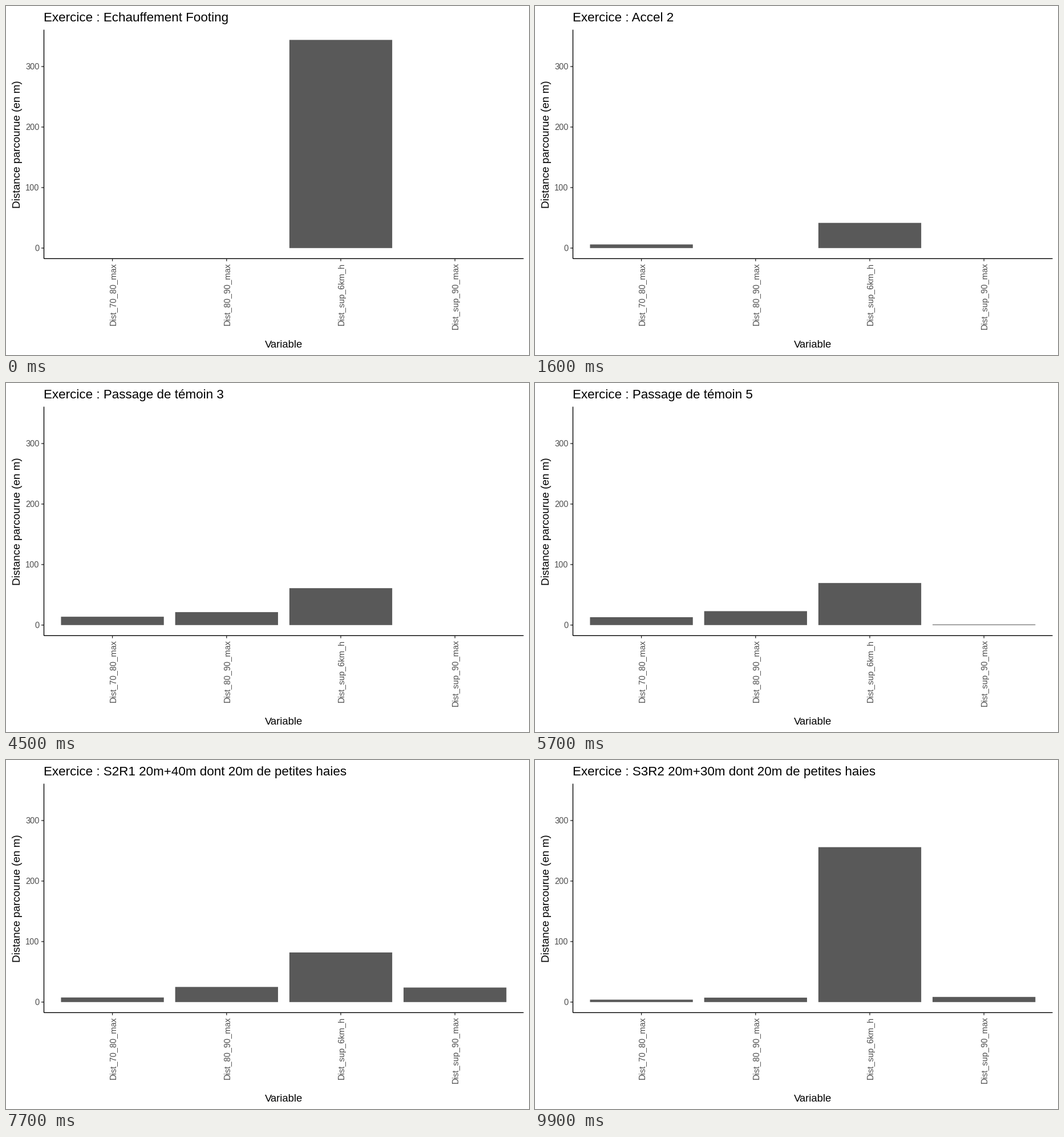
Write a matplotlib script that moves like this. It is 917 px wide and 611 px high and loops after 10 s.

```python
import matplotlib.pyplot as plt
from matplotlib.animation import FuncAnimation
from matplotlib.patches import Rectangle

W, H, DPI = 917, 611, 120
LEFT, RIGHT, TOP, BOTTOM = 66.5, 907.5, 41.5, 442.3
ZERO_Y, PX_PER_M = 423.8, 1.0594
LINE = 1.4
FIRST_X, STEP_X, BAR_W = 186.6, 200.2, 180.3

LABELS = ["Dist_70_80_max", "Dist_80_90_max", "Dist_sup_6km_h", "Dist_sup_90_max"]

SHORT = "20m+30m dont 20m de petites haies"
LONG = "20m+40m dont 20m de petites haies"

# Exercise name and the four distances in metres
STATES = [
    ("Echauffement Footing", (0, 0, 344, 0)),
    ("Echauffement Gammes", (0, 0, 109.6, 0)),
    ("Accel 1", (0, 0, 36, 0)),
    ("Accel 2", (8, 0, 43.5, 0)),
    ("Accel 3", (12.3, 0, 48, 0)),
    ("Passage de témoin 1", (19.4, 0, 53, 0)),
    ("Passage de témoin 2", (14.2, 18, 57, 0)),
    ("Passage de témoin 3", (15.3, 20, 60, 0)),
    ("Passage de témoin 4", (12.3, 22.8, 62, 0)),
    ("Passage de témoin 5", (14, 21, 65, 0)),
    ("S1R1 " + SHORT, (12, 25, 74, 2)),
    ("S1R2 " + SHORT, (9.5, 27, 78, 19.5)),
    ("S1R3 " + SHORT, (10.5, 23, 82, 23.5)),
    ("S2R1 " + LONG, (7.6, 25, 82, 24)),
    ("S2R2 " + LONG, (11.3, 24, 83, 26)),
    ("S3R1 " + SHORT, (11.7, 23, 85, 27)),
    ("S3R2 " + SHORT, (12, 22, 80, 25.5)),
]

plt.rcParams["font.family"] = "Liberation Sans"
plt.rcParams["text.hinting"] = "no_autohint"
fig = plt.figure(figsize=(W / DPI, H / DPI), dpi=DPI, facecolor="white")
ax = fig.add_axes([0, 0, 1, 1])
ax.set_xlim(0, W)
ax.set_ylim(H, 0)
ax.axis("off")


def box(x0, y0, x1, y1, color):
    return ax.add_patch(Rectangle((x0, y0), x1 - x0, y1 - y0, fc=color, lw=0,
                                  snap=False))


def hline(x0, x1, y, color):
    box(x0, y - LINE / 2, x1, y + LINE / 2, color)


def vline(x, y0, y1, color):
    box(x - LINE / 2, y0, x + LINE / 2, y1, color)


def label(x, y, text, size, color="black", ha="left", angle=0):
    return ax.text(x, y, text, size=size, color=color, ha=ha, va="baseline",
                   rotation=angle, rotation_mode="anchor")


bars = []
for i, name in enumerate(LABELS):
    x = FIRST_X + STEP_X * i
    bars.append(box(x - BAR_W / 2, ZERO_Y, x + BAR_W / 2, ZERO_Y, "#595959"))
    vline(x, BOTTOM, BOTTOM + 4.5, "#333333")
    label(x + 5.4, 449.3, name, 8.75, "#4D4D4D", "right", 90)

for metres in (0, 100, 200, 300):
    y = ZERO_Y - metres * PX_PER_M
    hline(LEFT - 4.5, LEFT, y, "#333333")
    label(58.4, y + 5.4, str(metres), 8.8, "#4D4D4D", "right")

vline(LEFT, TOP, BOTTOM, "black")
hline(LEFT, RIGHT, BOTTOM, "black")

title = label(66.3, 27, "", 13.45)
label(25, 242, "Distance parcourue (en m)", 11.35, ha="center", angle=90)
label(486.8, 598, "Variable", 11, ha="center")


def update(frame):
    # Each cycle of six frames: four moving steps, then a rest
    k, step = divmod(frame - 2, 6)
    last = k == len(STATES) - 1
    t = min(1, (step + 1) / (3 if last else 4))
    name, start = STATES[k]
    next_name, end = STATES[(k + 1) % len(STATES)]
    title.set_text("Exercice : " + (next_name if t > 0.5 and not last else name))
    for bar, a, b in zip(bars, start, end):
        bar.set_height(-PX_PER_M * (a + (b - a) * t))
    return [title, *bars]


anim = FuncAnimation(fig, update, frames=100, interval=100, repeat=True, repeat_delay=0)
plt.show()
```
